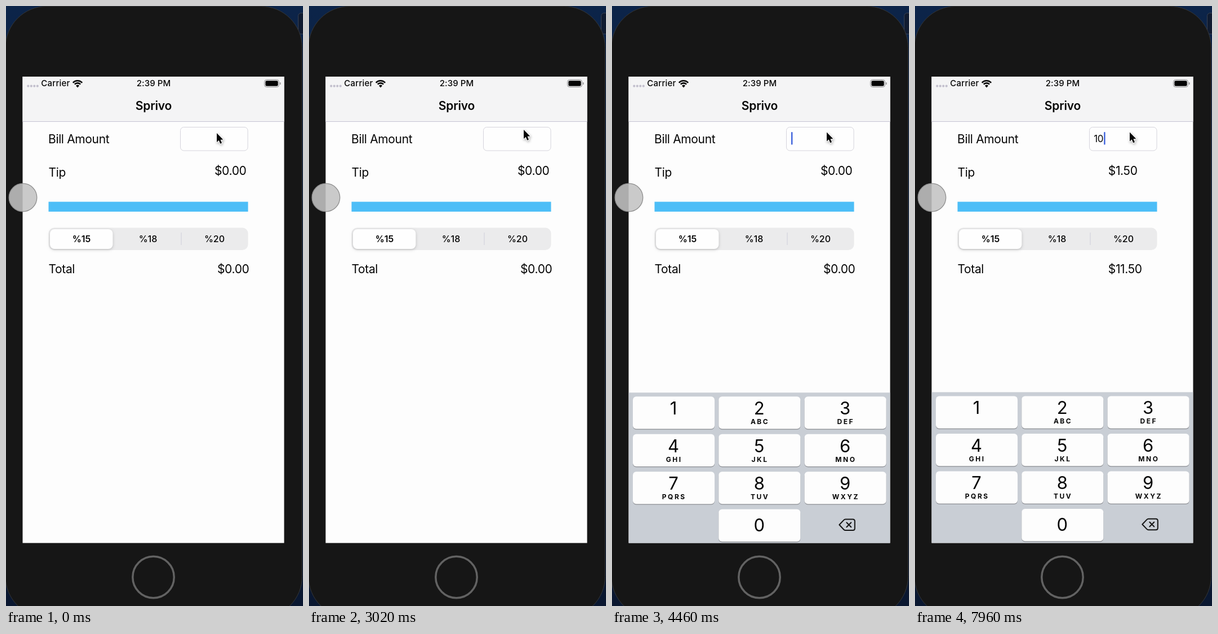
These frames come from a looping animation (527x1062 px, 8 s). An HTML page with a canvas:

```html
<!DOCTYPE html>
<html lang="en">
<head>
<meta charset="utf-8">
<title>Tip calculator</title>
<style>
html, body { margin: 0; width: 527px; height: 1062px; overflow: hidden; background: #0b1c3c; }
canvas { display: block; width: 527px; height: 1062px; }
</style>
</head>
<body>
<canvas id="stage" width="527" height="1062"></canvas>
<script>
const ctx = document.getElementById('stage').getContext('2d');
const LOOP = 8000;
const FOCUS = 3430;
const TYPE_1 = 7180;
const TYPE_2 = 7520;
const FONT = 'Inter, Roboto, "Liberation Sans", sans-serif';
const LETTERS = ['', 'ABC', 'DEF', 'GHI', 'JKL', 'MNO', 'PQRS', 'TUV', 'WXYZ'];
// pointer path: time, x, y
const PATH = [[0, 374, 225], [300, 374, 225], [1000, 385, 242], [1700, 385, 242],
  [2500, 381, 219], [3750, 381, 219], [4200, 381, 223.5], [LOOP, 381, 223.5]];

function box(x, y, w, h, r, fill, stroke, line = 1) {
  ctx.beginPath();
  ctx.roundRect(x, y, w, h, r);
  if (fill) { ctx.fillStyle = fill; ctx.fill(); }
  if (stroke) { ctx.strokeStyle = stroke; ctx.lineWidth = line; ctx.stroke(); }
}

function disc(x, y, r, fill, stroke, line = 1) {
  ctx.beginPath();
  ctx.arc(x, y, r, 0, Math.PI * 2);
  if (fill) { ctx.fillStyle = fill; ctx.fill(); }
  if (stroke) { ctx.strokeStyle = stroke; ctx.lineWidth = line; ctx.stroke(); }
}

function text(str, x, y, size, { weight = 400, space = 0, align = 'left' } = {}) {
  ctx.font = `${weight} ${size}px ${FONT}`;
  ctx.letterSpacing = space + 'px';
  ctx.textAlign = align;
  ctx.fillStyle = '#050505';
  ctx.fillText(str, x + (align === 'center' ? space / 2 : 0), y);
}

const label = (str, x, y) => text(str, x, y, 21, { space: -0.35 });

function shadow(color, blur, dx, dy) {
  ctx.shadowColor = color;
  ctx.shadowBlur = blur;
  ctx.shadowOffsetX = dx;
  ctx.shadowOffsetY = dy;
}

function drawPhone() {
  const sky = ctx.createLinearGradient(0, 0, 0, 1062);
  sky.addColorStop(0, '#0c2449');
  sky.addColorStop(1, '#0a1730');
  ctx.fillStyle = sky;
  ctx.fillRect(0, 0, 527, 1062);
  box(518.5, 12.5, 20, 37, 5, '#101b30', '#3a4252');
  box(-1, 0.5, 526.5, 1082, 73, '#161616', '#343638');
  disc(261.5, 1011, 36.7, null, '#626262', 3.5);
  ctx.fillStyle = '#fdfdfd';
  ctx.fillRect(29.5, 125, 464, 825.5);
}

function drawHeader() {
  ctx.fillStyle = '#f4f4f5';
  ctx.fillRect(29.5, 125, 464, 79.5);
  ctx.fillStyle = '#c5c3d3';
  ctx.fillRect(29.5, 204, 464, 1);
  for (let i = 0; i < 4; i++) disc(39.3 + i * 5.5, 141.7, 2.1, '#c2bfcd');
  text('Carrier', 62.3, 142.3, 15, { weight: 500, space: 0.2 });
  text('2:39 PM', 262, 142.3, 15, { weight: 500, space: 0.1, align: 'center' });
  text('Sprivo', 262, 184.3, 21, { weight: 600, space: -0.2, align: 'center' });

  ctx.strokeStyle = '#050505';
  ctx.lineWidth = 2.6;
  for (const r of [11.2, 7.1]) {
    ctx.beginPath();
    ctx.arc(127, 143.5, r, -Math.PI * 0.76, -Math.PI * 0.24);
    ctx.stroke();
  }
  ctx.beginPath();
  ctx.moveTo(127, 144.5);
  ctx.arc(127, 143.8, 4.1, -Math.PI * 0.76, -Math.PI * 0.24);
  ctx.fillStyle = '#050505';
  ctx.fill();

  box(458.5, 130.5, 26, 13, 4, null, '#8c8c8e');
  box(460.3, 132.3, 22.4, 9.4, 2.3, '#050505');
  box(486, 135, 1.5, 4.2, 0.8, '#8c8c8e');
}

function drawForm(t) {
  const typed = t >= TYPE_2 ? '10' : t >= TYPE_1 ? '1' : '';
  const bill = Number(typed);
  const money = n => '$' + n.toFixed(2);

  label('Bill Amount', 75, 243);
  box(309.5, 214.5, 119.5, 41.5, 6, '#fefefe', '#d5d4dc');
  text(typed, 317.3, 241.3, 17, { space: -0.4 });
  const blinkOn = t >= TYPE_1 || (t >= FOCUS && (t - FOCUS) % 1000 < 600);
  if (blinkOn) {
    box(318 + [0, 7.5, 17.2][typed.length], 223, 2.4, 22.5, 1, '#3d62dc');
  }

  label('Tip', 75.5, 302);
  label(money(bill * 0.15), bill ? 342.8 : 370, 299.3);
  ctx.fillStyle = '#4dbef7';
  ctx.fillRect(75.5, 346.5, 354, 17.5);

  box(75.5, 392.5, 354, 39.5, 10, '#ebebec');
  ctx.save();
  shadow('rgba(0,0,0,.2)', 5, 0, 1.5);
  box(78, 395, 111.5, 35, 8, '#fefefe');
  ctx.restore();
  ctx.fillStyle = '#d0cfd9';
  ctx.fillRect(310.5, 401, 1, 22);
  ['%15', '%18', '%20'].forEach((s, i) =>
    text(s, 134 + i * 118, 418, 16, { weight: i ? 500 : 600, align: 'center' }));

  label('Total', 75.5, 472.5);
  label(money(bill * 1.15), bill ? 342.8 : 375, 472.5);
}

function drawKey(x, y, digit, letters) {
  box(x, y + 1.2, 145, 57.3, 6, '#8b8d92');
  box(x, y, 145, 57.3, 6, '#fdfdfd');
  const mid = x + 72;
  text(digit, mid, y + (digit === '0' ? 38.8 : 31.7), 31, { align: 'center' });
  text(letters, mid, y + 48.8, 12, { weight: 700, space: 2.5, align: 'center' });
}

function drawDelete(x, y) {
  ctx.lineWidth = 2;
  ctx.lineJoin = ctx.lineCap = 'round';
  ctx.strokeStyle = '#151515';
  ctx.beginPath();
  ctx.moveTo(x, y);
  ctx.lineTo(x + 8, y - 8.4);
  ctx.quadraticCurveTo(x + 9.3, y - 9.7, x + 11, y - 9.7);
  ctx.lineTo(x + 24, y - 9.7);
  ctx.quadraticCurveTo(x + 27.5, y - 9.7, x + 27.5, y - 6.2);
  ctx.lineTo(x + 27.5, y + 6.2);
  ctx.quadraticCurveTo(x + 27.5, y + 9.7, x + 24, y + 9.7);
  ctx.lineTo(x + 11, y + 9.7);
  ctx.quadraticCurveTo(x + 9.3, y + 9.7, x + 8, y + 8.4);
  ctx.closePath();
  ctx.moveTo(x + 13, y - 4);
  ctx.lineTo(x + 21, y + 4);
  ctx.moveTo(x + 21, y - 4);
  ctx.lineTo(x + 13, y + 4);
  ctx.stroke();
}

function drawKeyboard(t) {
  if (t < FOCUS) return;
  // critically damped spring, then a last small settle
  const s = (t - FOCUS) * 0.01826;
  const top = 683.5 + 266.5 * (1 + s) * Math.exp(-s) + (t < 5000 ? 0.8 : 0);
  ctx.save();
  ctx.beginPath();
  ctx.rect(29.5, 125, 464, 825.5);
  ctx.clip();
  ctx.fillStyle = '#c9ced5';
  ctx.fillRect(29.5, top, 464, 267);
  LETTERS.forEach((letters, i) =>
    drawKey(37 + (i % 3) * 152.3, top + 7 + Math.floor(i / 3) * 66.5, String(i + 1), letters));
  drawKey(189.3, top + 206.5, '0', '');
  drawDelete(403.3, top + 234);
  ctx.restore();
}

function drawPointer(t) {
  const i = Math.max(1, PATH.findIndex(p => p[0] > t));
  const [t0, x0, y0] = PATH[i - 1];
  const [t1, x1, y1] = PATH[i];
  const k = (t - t0) / (t1 - t0);
  const e = k * k * (3 - 2 * k);
  ctx.save();
  ctx.translate(x0 + (x1 - x0) * e, y0 + (y1 - y0) * e);
  ctx.beginPath();
  ctx.moveTo(0, 0);
  for (const [x, y] of [[0, 16], [3.7, 12.7], [6.2, 18.8], [9, 17.6], [6.5, 11.7], [11.3, 11.4]]) {
    ctx.lineTo(x, y);
  }
  ctx.closePath();
  ctx.lineJoin = 'round';
  ctx.lineWidth = 2;
  ctx.strokeStyle = '#fff';
  shadow('rgba(0,0,0,.35)', 4, 1, 2);
  ctx.stroke();
  ctx.shadowColor = 'transparent';
  ctx.fillStyle = '#050505';
  ctx.fill();
  ctx.restore();
}

function draw(now) {
  const t = now % LOOP;
  drawPhone();
  drawHeader();
  drawForm(t);
  drawKeyboard(t);
  disc(30, 339, 24.8, 'rgba(195,195,195,.875)', '#8f8f8f', 1.3);
  drawPointer(t);
}

const start = performance.now();
function tick() {
  draw(performance.now() - start);
  requestAnimationFrame(tick);
}
tick();
</script>
</body>
</html>
```
